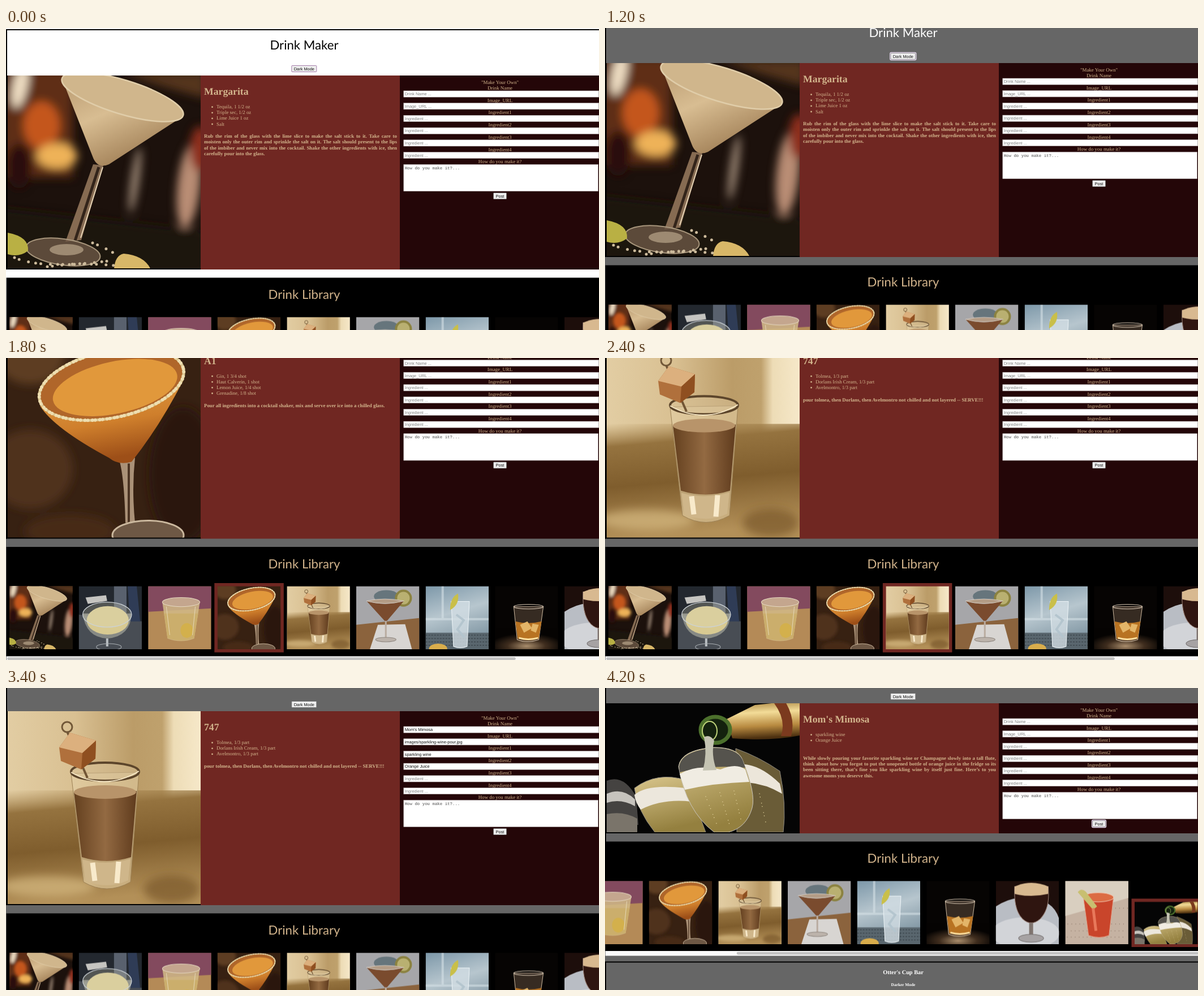
An HTML page that plays this animation: 1048 by 534 pixels, repeating every 4400 ms.

```html
<!DOCTYPE html>
<html lang="en">
<head>
<meta charset="utf-8">
<title>Drink Maker</title>
<style>
  html, body { margin: 0; width: 100%; height: 100%; overflow: hidden; }
  #stage { display: block; width: 100vw; height: 100vh; }
  text { font: 8.9px "Liberation Serif", serif; fill: #d2b48c; text-rendering: geometricPrecision; }
  .title { font: 22.2px Lato, sans-serif; }
  .h1 { font-size: 17.7px; font-weight: bold; }
  .how { font-weight: bold; }
  .mid { text-anchor: middle; }
  .ui { font: 7.4px "Liberation Sans", sans-serif; fill: #111; }
  .mono { font: bold 7.4px "Liberation Mono", monospace; fill: #333; }
  .hint { fill: #808080; }
  .foot { font-size: 10.3px; font-weight: bold; fill: #fff; }
  .small { font-size: 7.4px; font-weight: bold; fill: #fff; }
  .field { fill: #fff; stroke: #a39a9a; stroke-width: .6; }
  .button { fill: #efefef; stroke: #6d6d6d; stroke-width: .8; }
  .ring { fill: none; stroke: #eadcf2; stroke-width: 1.3; }
</style>
</head>
<body>
<svg id="stage" viewBox="0 0 1048 534" preserveAspectRatio="none">
<defs>
  <filter id="blur" x="-50%" y="-50%" width="200%" height="200%"><feGaussianBlur stdDeviation="8"/></filter>
  <linearGradient id="cream" x2=".6" y2="1"><stop stop-color="#b99a70"/><stop offset=".45" stop-color="#d8bd92"/><stop offset="1" stop-color="#9d7b52"/></linearGradient>
  <linearGradient id="orange" x2=".3" y2="1"><stop stop-color="#e2a048"/><stop offset=".6" stop-color="#cf7f2c"/><stop offset="1" stop-color="#9d4f18"/></linearGradient>
  <linearGradient id="sand"><stop stop-color="#e2cda3"/><stop offset=".35" stop-color="#d9c092"/><stop offset=".65" stop-color="#bb9c68"/><stop offset=".8" stop-color="#bfa16d"/><stop offset=".86" stop-color="#eddcb6"/><stop offset="1" stop-color="#f6e8c9"/></linearGradient>
  <linearGradient id="floor" x2=".15" y2="1"><stop stop-color="#a8864f" stop-opacity="0"/><stop offset=".2" stop-color="#95733f"/><stop offset=".55" stop-color="#7f5d2d"/><stop offset="1" stop-color="#b39058"/></linearGradient>
  <linearGradient id="coffee"><stop stop-color="#64401f"/><stop offset=".5" stop-color="#936a42"/><stop offset="1" stop-color="#5f3b1d"/></linearGradient>
  <linearGradient id="foil" x2=".1" y2="1"><stop stop-color="#9c7430"/><stop offset=".35" stop-color="#f3dc98"/><stop offset=".7" stop-color="#b88a40"/><stop offset="1" stop-color="#4c3010"/></linearGradient>
  <linearGradient id="fizz" x2=".3" y2="1"><stop stop-color="#d9c68c"/><stop offset="1" stop-color="#94803f"/></linearGradient>
  <linearGradient id="sky" x2=".3" y2="1"><stop stop-color="#7d98a9"/><stop offset=".5" stop-color="#b7c6ce"/><stop offset="1" stop-color="#7f95a2"/></linearGradient>
  <radialGradient id="wood" cx=".5" cy=".85" r=".6"><stop stop-color="#a98d6c"/><stop offset=".5" stop-color="#3f2d1e"/><stop offset="1" stop-color="#050302"/></radialGradient>

  <symbol id="d0" viewBox="0 0 341 341">
    <rect width="341" height="341" fill="#1c110c"/>
    <g filter="url(#blur)">
      <rect x="-10" width="125" height="190" y="-10" fill="#5f2d14"/>
      <ellipse cx="22" cy="18" rx="13" ry="40" fill="#f0dfc4" transform="rotate(12 22 18)"/>
      <ellipse cx="60" cy="88" rx="32" ry="42" fill="#c4561d"/>
      <ellipse cx="87" cy="142" rx="36" ry="22" fill="#eeb258"/>
      <ellipse cx="20" cy="160" rx="22" ry="40" fill="#2a1109"/>
      <path d="M200-5h150v45q-80-20-150-45" fill="#55341f"/>
      <ellipse cx="225" cy="185" rx="7" ry="58" fill="#a38e7c" transform="rotate(8 225 185)"/>
      <ellipse cx="320" cy="195" rx="20" ry="75" fill="#b98d74" transform="rotate(6 320 195)"/>
      <ellipse cx="340" cy="130" rx="18" ry="40" fill="#8c2e1e"/>
      <path d="M-10 235L351 275V351H-10z" fill="#1b1310"/>
    </g>
    <path d="M151 157l18 2-39 132-28 3z" fill="#866b52"/>
    <path d="M161 162l-42 130" stroke="#33241a" stroke-width="5"/>
    <path d="M168 162l-39 125" stroke="#e5d2b4" stroke-width="2"/>
    <ellipse cx="98" cy="312" rx="66" ry="23" fill="#6d5846" fill-opacity=".8" stroke="#a8967c" stroke-width="2" transform="rotate(8 98 312)"/>
    <ellipse cx="104" cy="308" rx="30" ry="10" fill="#c9b698" fill-opacity=".6"/>
    <path d="M96 6L150 143q8 23 29 14L310 72Q220 0 96 6" fill="url(#cream)"/>
    <ellipse cx="203" cy="38" rx="112" ry="30" fill="#d0b68c" stroke="#e0cda9" stroke-width="2.5" transform="rotate(17 203 38)"/>
    <path d="M0 278q38 7 36 32-16 12-36 6z" fill="#b9b044"/>
    <path d="M188 341q2-23 17-26 35 3 47 26z" fill="#d8b768"/>
    <path d="M12 322q50 22 180 4M70 338q60-8 120-2M150 296q30 12 40 20" fill="none" stroke="#cdbb9c" stroke-width="5" stroke-linecap="round" stroke-dasharray="0 9 0 17 0 13"/>
  </symbol>

  <symbol id="d1" viewBox="0 0 111 111">
    <rect width="111" height="111" fill="#23282f"/>
    <path d="M0 50L111 62V111H0z" fill="#484d54"/>
    <path d="M62 0h22v50H62z" fill="#59616e"/><path d="M86 0h16l6 62H90z" fill="#2f3c56"/>
    <path d="M12 20l36-4 2 10-34 5z" fill="#c5c4c0"/>
    <path d="M7 48q5 42 43 44 41-3 43-44z" fill="#a3a49a" fill-opacity=".7"/>
    <ellipse cx="51" cy="60" rx="37" ry="25" fill="#d8ca92"/>
    <ellipse cx="50" cy="50" rx="43" ry="22" fill="#e0dcc0" fill-opacity=".25" stroke="#ccd2d6" stroke-width="1.3"/>
    <path d="M50 92v14" stroke="#b9bec2" stroke-width="4"/><ellipse cx="53" cy="107" rx="22" ry="6" fill="none" stroke="#a9aeb2"/>
  </symbol>

  <symbol id="d2" viewBox="0 0 111 111">
    <rect width="111" height="111" fill="#b48a57"/><path d="M0 0h111v39L0 45z" fill="#834a5e"/>
    <path d="M25 28l9 64q24 9 47 0l10-64z" fill="#d3bb88" fill-opacity=".85"/>
    <path d="M28 48l6 43q24 9 47 0l7-43z" fill="#cbae6c"/>
    <ellipse cx="68" cy="78" rx="11" ry="13" fill="#d3b04c"/>
    <ellipse cx="58" cy="28" rx="33" ry="8" fill="#c4a68e" stroke="#e6d9c2"/>
    <path d="M32 36l6 50M83 36l-5 50" stroke="#e5d7b4"/>
  </symbol>

  <symbol id="d3" viewBox="0 0 341 341">
    <rect width="341" height="341" fill="#372112"/>
    <g filter="url(#blur)"><ellipse cx="40" cy="220" rx="75" ry="70" fill="#50301a"/><ellipse cx="40" cy="20" rx="60" ry="50" fill="#5d3c20"/><ellipse cx="310" cy="230" rx="60" ry="120" fill="#2a180d"/><ellipse cx="110" cy="330" rx="80" ry="30" fill="#472b17"/></g>
    <path d="M196 200q10 30 12 115h17q-6-60 0-115z" fill="#aa9177"/><path d="M214 210v105" stroke="#4b3423" stroke-width="4"/>
    <ellipse cx="248" cy="337" rx="63" ry="26" fill="#6e5845" stroke="#cbb89e" stroke-width="3"/>
    <path d="M57 108q25 40 122 92 17 14 40 7 48-60 92-145z" fill="url(#orange)"/>
    <g transform="rotate(-12 183 68)">
      <ellipse cx="183" cy="70" rx="130" ry="59" fill="#b0662a" stroke="#d9c48e" stroke-width="5"/>
      <ellipse cx="188" cy="77" rx="112" ry="46" fill="#e1983b"/>
      <ellipse cx="183" cy="70" rx="130" ry="59" fill="none" stroke="#eedeb0" stroke-width="6" stroke-linecap="round" stroke-dasharray="0 5 0 8"/>
    </g>
  </symbol>

  <symbol id="d4" viewBox="0 0 341 341">
    <rect width="341" height="341" fill="url(#sand)"/><rect y="140" width="341" height="201" fill="url(#floor)"/>
    <g filter="url(#blur)"><ellipse cx="70" cy="310" rx="85" ry="18" fill="#d6b981" opacity=".7"/><ellipse cx="290" cy="315" rx="50" ry="25" fill="#79572a" opacity=".7"/></g>
    <path d="M112 110l22 192q41 24 83 0l15-194z" fill="#e6d2a8" fill-opacity=".55" stroke="#9c8055"/>
    <path d="M117 143q55 20 111-2l-10 117q-43 14-87 0z" fill="url(#coffee)"/>
    <ellipse cx="172" cy="143" rx="55" ry="12" fill="#b8946a"/>
    <path d="M132 262q43 12 85-1l-4 38q-36 17-76 1z" fill="#cfb68a"/><path d="M150 268l4 32M196 266l-3 38" stroke="#f8eacb" stroke-width="9"/>
    <ellipse cx="172" cy="107" rx="60" ry="16" fill="#d9c49a" fill-opacity=".5" stroke="#5c452b" stroke-width="4"/>
    <path d="M112 108q60 34 120-2" fill="none" stroke="#f5e6c4" stroke-width="2"/>
    <path d="M105 36l36 82" stroke="#715535" stroke-width="4"/>
    <path d="M91 64l19-26 46 14-1 32-25 19-36-15z" fill="#b0703c"/><path d="M91 64l19-26 46 14-24 22z" fill="#dcb07e"/><path d="M132 74l24-22-1 32-25 19z" fill="#8f4f20"/>
    <circle cx="105" cy="28" r="9" fill="none" stroke="#725838" stroke-width="3"/>
  </symbol>

  <symbol id="d5" viewBox="0 0 111 111">
    <rect width="111" height="111" fill="#a6a6a9"/><path d="M0 68L111 56V111H0z" fill="#8b633d"/>
    <path d="M38 68l48-1 12 44H24z" fill="#d8d5d2"/>
    <ellipse cx="53" cy="18" rx="22" ry="11" fill="#66757c"/><circle cx="83" cy="21" r="15" fill="#8b8240"/><circle cx="83" cy="21" r="11" fill="#b9b071"/>
    <path d="M18 26q32 10 66 0L55 60q-3 4-6 0z" fill="#7a4b2e"/><path d="M18 26q32-7 66 0-34 9-66 0" fill="#b39c86" stroke="#ded8d0" stroke-width=".8"/>
    <path d="M52 61v31" stroke="#b9aca0" stroke-width="3"/><ellipse cx="52" cy="94" rx="18" ry="4" fill="#bcb3ab" stroke="#8f8780"/>
  </symbol>

  <symbol id="d6" viewBox="0 0 111 111">
    <rect width="111" height="111" fill="url(#sky)"/><path d="M0 58h111M30 0v58" stroke="#d6e1e6" stroke-width="4" opacity=".6"/>
    <path d="M0 82h111v29H0z" fill="#59666e"/><path d="M0 86h111M0 92h111M0 98h111M0 104h111" stroke="#31393e" stroke-dasharray="3 2"/>
    <path d="M45 27l4 79q12 5 24 0l4-79z" fill="#d2dee4" fill-opacity=".8" stroke="#edf4f7"/>
    <path d="M54 50l13 10-11 16 12 14" fill="none" stroke="#b4c5ce" stroke-width="4"/>
    <path d="M43 42q0-22 14-29 3 20-14 29" fill="#c9bf49"/><ellipse cx="22" cy="110" rx="16" ry="9" fill="#d9ad4c"/>
  </symbol>

  <symbol id="d7" viewBox="0 0 111 111">
    <rect width="111" height="111" fill="#060403"/><path d="M0 74h111v37H0z" fill="url(#wood)"/>
    <path d="M33 36l6 58q17 7 38 0l8-58z" fill="#7d6751" fill-opacity=".4" stroke="#cbb79e"/>
    <path d="M36 62q22 6 46 0l-5 30q-17 6-37 0z" fill="#b87322"/>
    <path d="M44 68l13-6 8 12-14 8zM66 66l11 2-5 14-9-4z" fill="#e3b568"/><path d="M42 91q16 5 34 0" stroke="#ffe0a0" stroke-width="3" fill="none"/>
    <ellipse cx="59" cy="36" rx="26" ry="4" fill="none" stroke="#e0d0bb"/>
  </symbol>

  <symbol id="d8" viewBox="0 0 111 111">
    <rect width="111" height="111" fill="#1d0e0b"/><path d="M0 45Q30 25 60 32q40 0 51 34v45H0z" fill="#b9bdc4"/><ellipse cx="52" cy="92" rx="60" ry="28" fill="#d2d4d8"/>
    <path d="M33 10q-2 42 14 57 15 14 31 0 18-18 14-57z" fill="#2f1510" stroke="#9b8176"/>
    <path d="M33 10q30-13 59 0v13q-30 7-59 0z" fill="#d8b990"/>
    <path d="M62 74v24" stroke="#7f746f" stroke-width="7"/><ellipse cx="62" cy="101" rx="22" ry="7" fill="#a6a2a3" stroke="#716c6b"/>
  </symbol>

  <symbol id="d9" viewBox="0 0 111 111">
    <rect width="111" height="111" fill="#c5b2a2"/><path d="M0 0h111v30L0 62z" fill="#d9cfc0"/>
    <path d="M4 76h104M10 88h98M3 99h105M60 48h50" stroke="#8d7869" stroke-width="1.5" stroke-dasharray="1 6"/>
    <path d="M32 30l9 66q19 7 36 0l8-68z" fill="#c9452b" stroke="#e3a28b"/><ellipse cx="58" cy="29" rx="27" ry="8" fill="#dc6b43" stroke="#f0cbb5"/>
    <path d="M22 20q6-8 14-1l20 26-7 6z" fill="#c8bf70"/><path d="M49 48l5 40" stroke="#e8785a" stroke-width="5"/>
  </symbol>

  <symbol id="d10" viewBox="0 0 341 228">
    <rect width="341" height="228" fill="#050505"/>
    <path d="M0 137q30-12 52 28l4 50H0z" fill="#454341"/><path d="M0 160q28-12 50 10v12q-25-14-50-6z" fill="#c6c3bd"/><path d="M0 196q30-6 54 8v24H0z" fill="#7a746a"/>
    <path d="M212 28l50-25 79-8v62q-50 10-119 5z" fill="url(#foil)"/><path d="M296 0l20-2q18 30 10 60h-18q10-28-12-58" fill="#7b3a1e"/>
    <ellipse cx="192" cy="47" rx="26" ry="23" fill="#14220e" stroke="#4c702c" stroke-width="7"/><ellipse cx="182" cy="49" rx="13" ry="17" fill="none" stroke="#bfd47a" stroke-width="2"/>
    <path d="M228 80q42 15 78 40 12 60 6 108h-82z" fill="#8c7a48" fill-opacity=".75" stroke="#8d8980"/><path d="M243 108q30 2 63 34l4 18q-30-18-62-20z" fill="#ece6da"/>
    <path d="M49 150q40-30 92-14l34 92H85Q54 190 49 150" fill="url(#fizz)" stroke="#8d8980"/><path d="M49 162q22-20 90-12l11 24q-50-6-90 14-9-12-11-26" fill="#ece7dc"/>
    <path d="M127 112q4-30 63-34 42 0 50 22 24 60 17 85-10 35-42 43h-25Q140 190 127 112" fill="url(#fizz)" stroke="#c8c4ba"/>
    <path d="M128 112q4-28 62-33 40 0 50 21l5 14q-60-6-116 8z" fill="#55534d"/>
    <path d="M129 125q30-18 72-8 28-12 44 0l7 22q-62 2-114 14z" fill="#f0ece2"/>
    <path d="M172 60q10-6 18 6-6 24 4 52l-24 1q8-30 2-59" fill="#c4c3b2"/>
    <path d="M175 165l20 50M200 158l18 60M225 155l12 50M270 160l12 55" stroke="#e0d099" stroke-width="1.6" stroke-linecap="round" stroke-dasharray="0 6 0 11"/>
  </symbol>
</defs>

<rect id="paper" width="1048" height="534"/>
<g id="page">
  <path d="M1 427V3H1050" fill="none" stroke="#000" stroke-width="2"/>
  <text id="name" class="title mid" x="527" y="38">Drink Maker</text>
  <g id="mode"></g>
  <g id="hero"></g>
  <g id="form"></g>
  <g id="library"></g>
</g>
</svg>
<script>
const $ = id => document.getElementById(id);
const PITCH = 122.6, THUMB = 111.5, WIDE = 341, TOP = 84;

const drinks = {
  0: { name: "Margarita",
    parts: ["Tequila, 1 1/2 oz", "Triple sec, 1/2 oz", "Lime Juice 1 oz", "Salt"],
    how: ["Rub the rim of the glass with the lime slice to make the salt stick to it. Take care to",
      "moisten only the outer rim and sprinkle the salt on it. The salt should present to the lips",
      "of the imbiber and never mix into the cocktail. Shake the other ingredients with ice, then",
      "carefully pour into the glass."] },
  3: { name: "A1",
    parts: ["Gin, 1 3/4 shot", "Haut Calverin, 1 shot", "Lemon Juice, 1/4 shot", "Grenadine, 1/8 shot"],
    how: ["Pour all ingredients into a cocktail shaker, mix and serve over ice into a chilled glass."] },
  4: { name: "747",
    parts: ["Tolmea, 1/3 part", "Dorlans Irish Cream, 1/3 part", "Avelmontro, 1/3 part"],
    how: ["pour tolmea, then Dorlans, then Avelmontro not chilled and not layered -- SERVE!!!"] },
  10: { name: "Mom's Mimosa",
    parts: ["sparkling wine", "Orange Juice"],
    how: ["While slowly pouring your favorite sparkling wine or Champagne slowly into a tall flute,",
      "think about how you forgot to put the unopened bottle of orange juice in the fridge so its",
      "been sitting there, that’s fine you like sparkling wine by itself just fine. Here’s to you",
      "awesome moms you deserve this."] }
};
const mimosa = drinks[10];
const labels = ["Drink Name", "Image_URL", "Ingredient1", "Ingredient2", "Ingredient3", "Ingredient4"];
const entries = [mimosa.name, "images/sparkling-wine-pour.jpg", ...mimosa.parts];

// Each step changes part of the state and holds until the next one.
const LOOP = 4400;
const steps = [
  [0, { dark: false, y: 0, sx: 0, drink: 0, hover: -1, typed: 0, caret: false, focus: "", count: 10 }],
  [600, { dark: true, focus: "mode" }],
  [1200, { y: 22 }],
  [1400, { y: 107.5 }],
  [1800, { drink: 3, hover: 3 }],
  [2400, { drink: 4, hover: 4 }],
  [2600, { y: 63, hover: -1, focus: "" }],
  [2800, { y: 43 }],
  [3000, { typed: 2 }],
  [3200, { typed: 4, caret: true }],
  [3400, { caret: false }],
  [3600, { typed: 5 }],
  [3800, { drink: 10, typed: 0, focus: "post", count: 11 }],
  [4000, { y: 57 }],
  [4200, { sx: 296, hover: 10 }]
];

const text = (x, y, s, c = "") => `<text x="${x}" y="${y}" class="${c}">${s}</text>`;
const rect = (x, y, w, h, more = "") => `<rect x="${x}" y="${y}" width="${w}" height="${h}" ${more}/>`;
const image = (i, x, y, w, h) => `<use href="#d${i}" x="${x}" y="${y}" width="${w}" height="${h}"/>`;
const heightOf = i => i === 10 ? 228 : WIDE;

function button(x, y, w, label, focused, edge = "#6d6d6d") {
  return rect(x, y, w, 11, `class="button" rx="1" style="stroke:${edge}"`) +
    (focused ? rect(x - 1, y - 1, w + 2, 13, 'class="ring" rx="2"') : "") +
    text(x + w / 2, y + 8.2, label, "ui mid");
}

function wrap(s, max) {
  const lines = [""];
  for (const word of s.split(" ")) {
    const last = lines.length - 1;
    if ((lines[last] + word).length > max) lines.push(word + " ");
    else lines[last] += word + " ";
  }
  return lines;
}

function justify(node, width) {
  const gaps = node.textContent.split(" ").length - 1;
  node.style.wordSpacing = (width - node.getComputedTextLength()) / gaps + "px";
}

function drawHero(s) {
  const d = drinks[s.drink], h = heightOf(s.drink);
  const howY = 164 + 10.1 * Math.max(d.parts.length - 1, 2);
  $("hero").innerHTML =
    rect(0, TOP, 345, h + 2) + image(s.drink, 3, TOP, WIDE, h) +
    rect(344, TOP, 352, h + 2, 'fill="#702722"') +
    text(350, 118, d.name, "h1") +
    d.parts.map((p, i) => `<circle cx="364.5" cy="${139.7 + 10.1 * i}" r="1.4" fill="#d2b48c"/>` +
      text(372, 142.2 + 10.1 * i, p)).join("") +
    d.how.map((line, i) => text(350, howY + 10.1 * i, line, "how")).join("");
  [...$("hero").querySelectorAll(".how")].slice(0, -1).forEach(n => justify(n, WIDE));
}

function drawForm(s) {
  let out = rect(696, TOP, 352, heightOf(s.drink) + 2, 'fill="#240608"') +
    text(873, 98.8, '"Make Your Own"', "mid");
  labels.forEach((label, i) => {
    const y = 109 + 21.7 * i, filled = i < s.typed && i < entries.length;
    const hint = label.replace(/\d/, "") + " ...";
    out += text(873, y, label, "mid") + rect(702.8, y + 2, 345, 11.2, 'class="field"') +
      text(704.7, y + 10.3, filled ? entries[i] : hint, filled ? "ui" : "ui hint");
  });
  out += text(873, 239, "How do you make it?", "mid") + rect(702.8, 241.2, 343.6, 47.4, 'class="field"');
  out += s.typed > 4
    ? wrap(mimosa.how.join(" "), 75).map((line, i) => text(704.7, 249.5 + 8.3 * i, line, "mono")).join("")
    : text(704.7, 249.5, "How do you make it?...", "mono hint");
  if (s.caret) out += rect(748.6, 177, 0.9, 10);
  $("form").innerHTML = out + button(861.5, 291.5, 23, "Post", s.focus === "post");
}

function drawLibrary(s) {
  const full = s.count * PITCH - 4, bar = 1048 * 1048 / full;
  let out = rect(0.7, 0, 1048, 193.5) + text(527, 37.5, "Drink Library", "title mid");
  for (let i = 0; i < s.count; i++) {
    const x = 6 + PITCH * i - s.sx, h = THUMB * heightOf(i) / WIDE, y = 69.5 + THUMB - h;
    if (i === s.hover) out += rect(x - 5.5, y - 5.5, THUMB + 11, h + 11, 'fill="#702722"');
    out += image(i, x, y, THUMB, h);
  }
  out += rect(0.7, 193.5, 1048, 8.5, 'fill="#fafafa"') +
    rect(2 + s.sx * 1048 / full, 195.3, bar, 4.6, 'rx="2.3" fill="#c1c1c1"') +
    '<path d="M1 330V213H1050" fill="none" stroke="#000" stroke-width="2"/>' +
    text(527, 234.5, "Otter's Cup Bar", "foot mid") + text(527, 255.7, "Darker Mode", "small mid");
  $("library").innerHTML = out;
  $("library").setAttribute("transform", `translate(0 ${TOP + heightOf(s.drink) + 16.5})`);
}

function draw(s) {
  $("paper").setAttribute("fill", s.dark ? "#666" : "#fff");
  $("name").style.fill = s.dark ? "#fff" : "#000";
  $("mode").innerHTML = button(504.8, 66.5, 44, "Dark Mode", s.focus === "mode", s.dark ? undefined : "#8f5c96");
  drawHero(s);
  drawForm(s);
  drawLibrary(s);
  $("page").setAttribute("transform", `translate(0 ${-s.y})`);
}

let shown = -1;
function tick() {
  const t = performance.now() % LOOP;
  const past = steps.filter(([at]) => at <= t);
  if (past.length !== shown) {
    shown = past.length;
    draw(Object.assign({}, ...past.map(([, change]) => change)));
  }
  requestAnimationFrame(tick);
}
tick();
</script>
</body>
</html>
```
